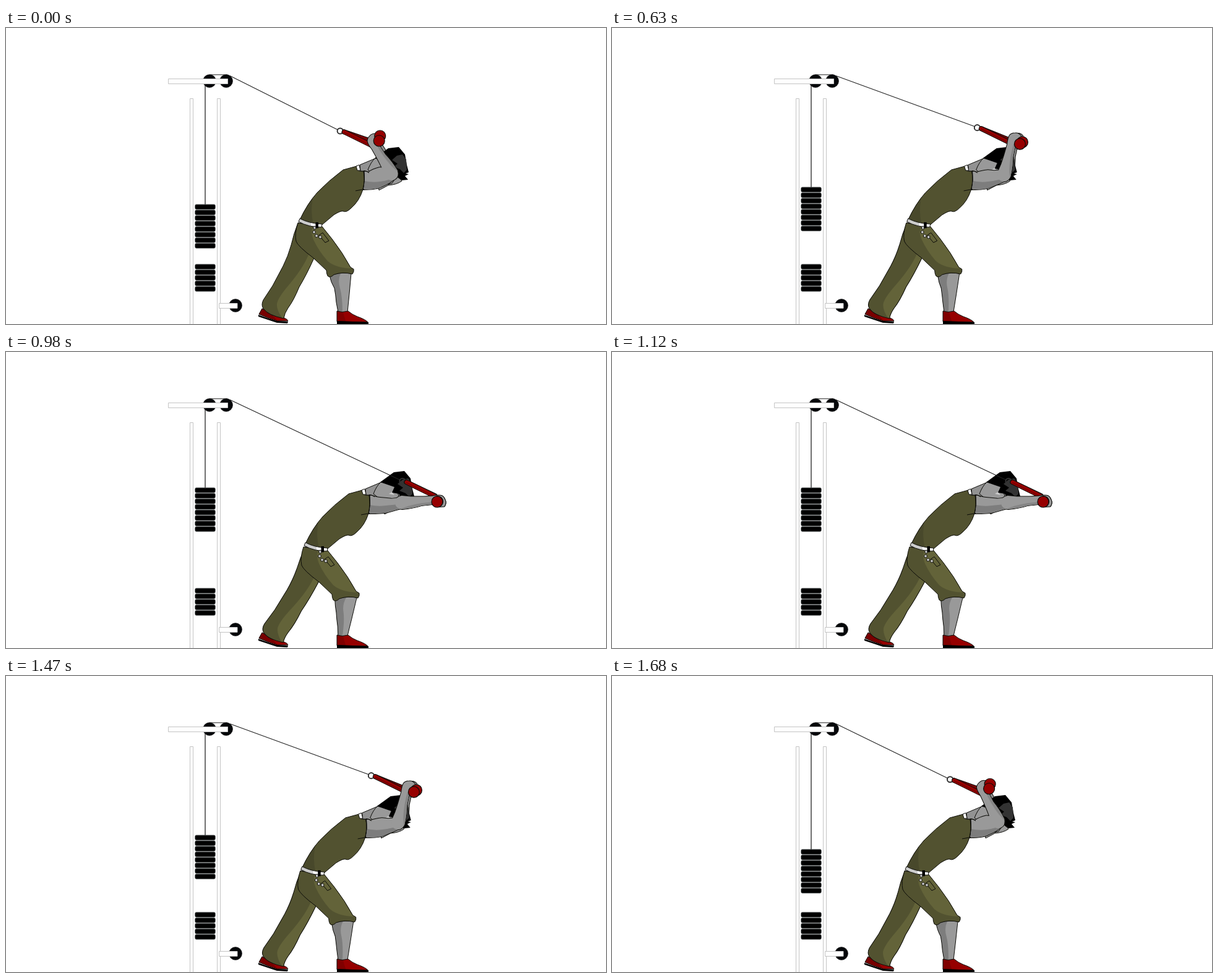
Animation of 970x480 px, one loop 2100 ms. Source, as an HTML page with a canvas:

```html
<!DOCTYPE html>
<html lang="en">
<head>
<meta charset="utf-8">
<title>Cable pull</title>
<style>
html, body { margin: 0; width: 100%; height: 100%; overflow: hidden; background: #fff; }
canvas { display: block; }
</style>
</head>
<body>
<canvas id="stage" width="970" height="480"></canvas>
<script>
const ctx = document.getElementById('stage').getContext('2d');
const STEP = 70, LOOP = 2100;
const INK = '#0c0c08', SKIN = '#999', SKIN_DARK = '#7d7d7d';
const OLIVE = '#525230', OLIVE_LIGHT = '#636339', OLIVE_DARK = '#48482b';
const RED = '#960000', RED_DARK = '#6c0000';

// pose, weight lift, body shift, elbow x/y, forearm angle,
// ball along/across the forearm, far ball offset, ring offset from ball
const KEYS = [
  [0, 0, 0, 623, 236, -118.6, 56, 8, 1.5, -8, -63, -16],
  [1, 5, 1, 623, 236, -114, 54.5, 8.5, 1.5, -7.5, -63, -15],
  [4, 28, 3.7, 630, 238, -74, 55, 11, 4, -3, -69, -26.5],
  [7, 56, 7, 631.5, 241, -19, 57, 11, 2.5, -1, -56, -37],
  [9, 66, 9, 631, 244, -2, 57, 1, 0.5, -0.5, -56, -33.5],
  [10, 70, 9.8, 631, 244.5, 1, 57, 0, 0, 0, -56, -33]
];

function poseAt(p) {
  let i = 0;
  while (i < KEYS.length - 2 && p > KEYS[i + 1][0]) i++;
  const a = KEYS[i], b = KEYS[i + 1], f = (p - a[0]) / (b[0] - a[0]);
  const [, lift, shift, ex, ey, angle, along, across, farX, farY, ringX, ringY] =
    a.map((v, j) => v + (b[j] - v) * f);
  const r = angle * Math.PI / 180, c = Math.cos(r), s = Math.sin(r);
  const ball = { x: ex + shift + along * c - across * s, y: ey + along * s + across * c };
  return { lift, shift, ex, ey, angle, ball, far: { x: farX, y: farY },
    ring: { x: ball.x + ringX, y: ball.y + ringY } };
}

const P = d => new Path2D(d);
const shapes = {
  rearLeg: P('M472 316Q465 334 461 352Q456 370 448 386L431 418L416 441Q412 449 416 455Q424 466 449 471Q450 463 456 454Q465 442 474 420Q486 400 498 373L500 320Z'),
  rearLight: P('M492 360Q484 385 457 417Q440 437 438 447Q437 458 449 474L530 440L510 350Z'),
  thigh: P('M472 316Q466 334 469 346Q472 354 497 373L518 393Q518 398 520 402Q524 406 530 400Q544 395 560 399Q563 395 562 391L557 388Q544 364 527 342L511 322Z'),
  thighLight: P('M498 318Q491 330 497 343Q505 361 520 378Q534 390 562 390L580 370L520 310Z'),
  shinShade: P('M520 398H541Q536 409 540 422Q544 436 544 462H530Z'),
  torso: P('M475 311Q487 285 503 267Q521 248 545 230L567 224L571 232H578Q581 249 577 262Q571 281 558 292Q550 300 545 297Q541 296 530 303L511 319Q491 320 475 311Z'),
  torsoShade: P('M470 310L500 264Q490 290 497 319H470Z'),
  belt: P('M475 309Q490 317 511 318L510 323Q489 323 473 314Z'),
  beltGrey: P('M470 305H493V325H470Z'),
  strap: P('M566 224L571 222L573 231L568 231Z'),
  pocket: P('M506 336L512 332L522 345L516 348Z'),
  neck: P('M572 222L598 211L618 202L632 240L624 252L582 258L578 232H573Z'),
  face: P('M585 230Q590 217 597 211L620 215L628 240L600 242Z'),
  chin: P('M588 258H602L603 263L618 255Q632 254 640 248L630 235L600 240Z'),
  hair: P('M596 211L618 195L635 193L645 205L648 222L651 234L646 236L651 237L645 240L650 246L640 247L634 243L626 230L615 228L619 219Z'),
  sheen: P('M624 214L632 207L641 205L647 213L648 230L643 235L637 229L627 225L633 220Z'),
  forearm: P('M0 11Q18 10 32 6L54 4.5L61 9L68 9Q72 4 70 -1Q68 -8 63 -9Q58 -10 50 -8.5Q30 -8 15 -9L0 -11Q-11 -9 -11 0Q-11 9 0 11Z'),
  forearmShade: P('M-7 12Q18 11 32 7L54 5L52 1Q30 1 10 6Z'),
  rearShoe: P('M414 455L409 464Q424 471 438 475H456Q455 472 449 470Q426 467 418 457Z'),
  rearSole: P('M408 465Q423 471 437 475L456 476L455 479L438 478L408 468Z'),
  frontShoe: P('M535 459Q543 462 553 459Q560 465 568 468Q580 472 585 477L535 476Z'),
  frontSole: P('M535 475L586 477V480H535Z')
};

function stroke(path, width = 1, color = INK) {
  ctx.lineWidth = width;
  ctx.strokeStyle = color;
  ctx.stroke(path);
}

function fill(path, color) {
  ctx.fillStyle = color;
  ctx.fill(path);
}

function shaded(path, color, shade, shadeColor) {
  fill(path, color);
  ctx.save();
  ctx.clip(path);
  fill(shade, shadeColor);
  ctx.restore();
}

function part(path, color, shade, shadeColor) {
  if (shade) shaded(path, color, shade, shadeColor);
  else fill(path, color);
  stroke(path);
}

function within(setup, draw) {
  ctx.save();
  setup();
  draw();
  ctx.restore();
}

// Leans a limb sideways while the given ground height stays put.
const lean = (ground, height, shift, draw) => within(() =>
  ctx.transform(1, 0, -shift / height, 1, shift * ground / height, 0), draw);

function circle(x, y, r, color, line, width = 1) {
  const c = new Path2D();
  c.arc(x, y, r, 0, Math.PI * 2);
  if (color) fill(c, color);
  if (line) stroke(c, width, line);
}

function line(x1, y1, x2, y2, width, color) {
  ctx.beginPath();
  ctx.moveTo(x1, y1);
  ctx.lineTo(x2, y2);
  ctx.lineWidth = width;
  ctx.strokeStyle = color;
  ctx.stroke();
}

function beam(x, y, w, h) {
  ctx.fillStyle = '#fff';
  ctx.fillRect(x, y, w, h);
  ctx.lineWidth = 1;
  ctx.strokeStyle = '#c4c4c4';
  ctx.strokeRect(x, y, w, h);
}

function stack(y, count) {
  for (let i = 0; i < count; i++) {
    const plate = new Path2D();
    plate.roundRect(305.8, y + i * 9 + 0.2, 32.4, 7.8, 2);
    fill(plate, '#000');
    stroke(plate, 0.8, '#3a3f40');
  }
}

function machine(lift) {
  beam(297.5, 114.5, 5, 380);
  beam(341.5, 114.5, 5, 380);
  circle(371, 450, 10.5, '#05070a', '#222', 0.7);
  beam(344.5, 446.5, 29.5, 8);
  circle(329, 86, 10.5, '#05070a', '#222', 0.7);
  circle(356, 86, 10.5, '#05070a', '#222', 0.7);
  line(329, 75.8, 358, 75.8, 1, '#222');
  line(322, 88, 322, 286 - lift, 1.3, '#222');
  beam(262.5, 82.5, 96, 8);
  stack(286 - lift, 8);
  stack(383, 5);
}

// The calf straightens as the knee moves forward.
function shin(shift) {
  const calf = 531 - shift * 0.3;
  return P(`M523 401Q525 412 ${calf} 422Q${calf + 2} 432 534 445L537 461H552L555 431L558 398Q542 395 523 401Z`);
}

function legs(shift) {
  part(shapes.rearShoe, RED, P('M405 450L420 454L440 476H405Z'), '#780000');
  fill(shapes.rearSole, '#000');
  lean(462, 110, shift, () => part(shapes.rearLeg, OLIVE, shapes.rearLight, OLIVE_LIGHT));
  lean(460, 61, shift, () => part(shin(shift), SKIN, shapes.shinShade, SKIN_DARK));
  part(shapes.frontShoe, RED, P('M530 455H544Q546 468 551 480H530Z'), '#800000');
  fill(shapes.frontSole, '#000');
}

function body() {
  part(shapes.thigh, OLIVE, shapes.thighLight, OLIVE_LIGHT);
  stroke(shapes.pocket);
  part(shapes.torso, OLIVE, shapes.torsoShade, OLIVE_DARK);
  part(shapes.belt, '#fff', shapes.beltGrey, '#ccc');
  [[499, 324], [498, 331], [502, 337], [508, 339]].forEach(([x, y]) => circle(x, y, 2.4, '#ccc', INK));
  ctx.fillStyle = '#000';
  ctx.fillRect(500.5, 315, 4.5, 9.5);
}

function head() {
  part(shapes.chin, SKIN);
  circle(618, 251, 3, '#111');
  part(shapes.neck, '#929292');
  part(shapes.face, SKIN);
  fill(P('M610 230L615 227L619 232Z'), '#ccc');
  fill(shapes.hair, '#000');
  fill(shapes.sheen, '#333');
  part(shapes.strap, '#fff');
}

const atElbow = (q, draw) => within(() => {
  ctx.translate(q.ex, q.ey);
  ctx.rotate(q.angle * Math.PI / 180);
}, draw);

function farArm(q) {
  within(() => ctx.translate(q.far.x * 0.5 - q.far.y * 0.6, 0), () =>
    atElbow(q, () => part(shapes.forearm, '#8d8d8d')));
}

function nearArm(q) {
  const open = (q.angle + 118.6) / 118, { ex, ey } = q;
  const crease = 229 + 7 * open, top = 226 + 11 * open;
  const upper = P(`M579 232L586 234Q592 ${crease} 604 ${top}L614 ${top + 1}L${ex} ${ey - 8}L${ex + 6} ${ey + 8}Q622 ${251 + 5 * open} 608 ${257 + 3 * open}Q600 262 578 262Q581 248 579 232Z`);
  const shade = P(`M575 247Q590 251 605 249Q622 247 ${ex + 12} ${ey + 2}V270H575Z`);
  stroke(upper, 2);
  atElbow(q, () => stroke(shapes.forearm, 2));
  shaded(upper, SKIN, shade, SKIN_DARK);
  atElbow(q, () => shaded(shapes.forearm, SKIN, shapes.forearmShade, '#858585'));
  stroke(P('M579 232Q581 248 577 262M565 264L579 261.5M578 232Q583 231 587 235'));
}

function strand(x1, y1, x2, y2, color) {
  ctx.lineCap = 'round';
  line(x1, y1, x2, y2, 8, INK);
  line(x1, y1, x2, y2, 6, color);
  line(x1, y1 + 1, x2, y2 + 1, 1.2, RED_DARK);
  ctx.lineCap = 'butt';
}

function handle({ ring, far }) {
  line(362, 77.5, ring.x - 4, ring.y - 2, 1.1, '#222');
  circle(ring.x, ring.y, 4.6, null, '#333', 2);
  const x = ring.x + 6.5, y = ring.y + 1.5, endX = ring.x + 52, endY = ring.y + 24;
  strand(x, y, endX + far.x, endY + far.y * 0.8, '#7c0000');
  strand(x, y, endX, endY, RED);
}

function draw(pose) {
  const q = poseAt(pose), { shift, ball, far } = q;
  const moved = paint => within(() => ctx.translate(shift, 0), paint);
  ctx.fillStyle = '#fff';
  ctx.fillRect(0, 0, 970, 480);
  ctx.lineJoin = 'round';
  machine(q.lift);
  legs(shift);
  moved(() => { farArm(q); body(); head(); });
  handle(q);
  moved(() => nearArm(q));
  circle(ball.x + far.x, ball.y + far.y, 9, RED, INK, 1.2);
  circle(ball.x, ball.y, 9, RED, INK, 1.2);
}

const start = performance.now();

function tick() {
  const n = Math.floor((performance.now() - start) % LOOP / STEP);
  draw(n < 6 ? 0 : n <= 15 ? n - 5 : Math.max(1, 25 - n));
  requestAnimationFrame(tick);
}

tick();
</script>
</body>
</html>
```
